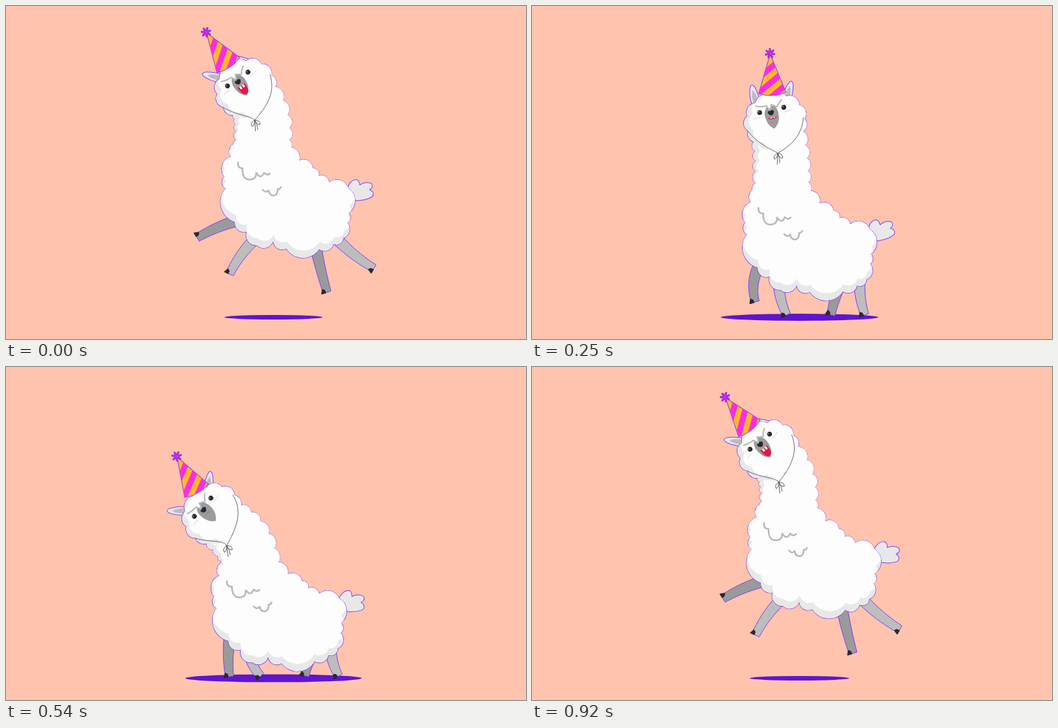
Recreate the animation shown at these times as an HTML page. Size 800x513 px, loop 940 ms.

```html
<!DOCTYPE html>
<html lang="en">
<head>
<meta charset="utf-8">
<title>Party llama</title>
<style>
html, body { margin: 0; width: 100%; height: 100%; overflow: hidden; background: #ffc3ae; }
svg { display: block; width: 100vw; height: 100vh; }
.line { stroke: #7a3cff; stroke-width: 1; stroke-linejoin: round; }
.thin { fill: none; stroke: #555; stroke-width: .9; stroke-linecap: round; }
.fleece { fill: none; stroke: #b9b9bb; stroke-width: 2.6; stroke-linecap: round; stroke-linejoin: round; }
</style>
</head>
<body>
<svg viewBox="0 0 800 513" preserveAspectRatio="none">
  <defs>
    <clipPath id="cone"><path d="M0-60L-21 0Q0 8 21 0Z"/></clipPath>
    <clipPath id="bodyClip"><path class="bodyShape"/></clipPath>
    <clipPath id="headClip"><path class="headShape"/></clipPath>
  </defs>
  <ellipse id="shadow" cx="411.5" cy="479.5" fill="#5f15cf"/>
  <g id="legs"></g>
  <g class="onBody">
    <path id="tail" class="line" fill="#e8e8e8" d="M525 284Q530 270 539 269Q546 268 546 278Q556 273 564 278Q567 284 560 287Q568 292 563 298Q553 303 535 301Z"/>
  </g>
  <g class="onHead">
    <g id="earL" class="ear"></g>
    <g id="earR" class="ear"></g>
  </g>
  <g class="onBody"><path class="bodyShape line"/></g>
  <path class="neckShape line"/>
  <g class="onHead"><path class="headShape line"/></g>
  <g class="onBody" clip-path="url(#bodyClip)">
    <path class="bodyShape" fill="#e8e8e8"/>
    <path class="bodyShape" fill="#fdfdfe" transform="translate(1 -11.500)"/>
  </g>
  <path class="neckShape" fill="#e8e8e8"/>
  <path id="neck" fill="#fdfdfe"/>
  <g class="onBody fleece">
    <path d="M357 241Q356 250 364 250Q363 268 376 267.500Q385 267 385 257Q392 268 397 257Q402 262 406 258"/>
    <path d="M395 283Q400 289 404 284Q405 292 412 292Q418 291 418 282Q421 283 423 279"/>
  </g>
  <g class="onHead" clip-path="url(#headClip)">
    <path class="headShape" fill="#e8e8e8"/>
    <path class="headShape" fill="#fdfdfe" transform="translate(13 -2) scale(1.1)"/>
  </g>
  <g class="onHead">
    <path fill="none" stroke="#dcdcde" d="M17 7Q24 8 31 5M-31 9Q-26 6 -19 8"/>
    <path fill="#9c9c9c" d="M-12 4Q-9-8-1-8Q7-8 9 4Q10 21-2 29Q-13 22-12 4Z"/>
    <path id="mouth" fill="#e2164a"/>
    <path id="teeth" fill="#fff"/>
    <path fill="#2a2830" d="M-7 3Q-6 0-2 0Q2 0 3 3Q1 8-2 8Q-5 8-7 3Z"/>
    <path class="fleece" style="fill:#fdfdfe;stroke-width:2.2" d="M-23-11Q-14-7-7-8L-3 0Q0-4 1-8Q6-5 9-3Q12-8 18-12"/>
    <g id="eyeL" class="eye"></g>
    <g id="eyeR" class="eye"></g>
    <g id="hat">
      <path class="line" fill="#fdb92a" d="M0-60L-21 0Q0 8 21 0Z"/>
      <path clip-path="url(#cone)" stroke="#ff2be2" stroke-width="9" d="M-30-16.500L30-61.500M-30 5.500L30-39.500M-30 27.500L30-17.500"/>
      <path class="pom" stroke="#7a1fe0" stroke-width="3.200" stroke-linecap="round"/>
      <path class="pom" stroke="#e02be6" stroke-width="1.500" stroke-linecap="round"/>
    </g>
  </g>
  <path id="string" class="thin"/>
  <path id="bow" class="thin" d="M0 0Q-8 3-6 9Q-2 9 0 0Q8 2 7 8Q2 9 0 0L-2 17M0 0Q3 8 2 15"/>
</svg>
<script>
const $ = id => document.getElementById(id);
const all = (cls, name, value) => document.querySelectorAll("." + cls).forEach(el => el.setAttribute(name, value));
const LOOP = 940, STEP = 20, RAD = Math.PI / 180;

// Key poses: time, body drop, head x, head y, head tilt
const poses = [
  [0, 0, 356.5, 112.5, -34],
  [80, 14, 377, 106, -18],
  [160, 50.5, 392, 130, -3],
  [320, 76.5, 342, 186, -25],
  [540, 83, 302.5, 216, -48],
  [660, 58, 297, 203, -72],
  [760, 13.5, 315, 150, -62],
  [920, -.5, 350.5, 115, -38]
];
const legs = [
  { hip: [508, 358], land: [512, 476], fly: [566, 404], bend: 5, fill: "#bdbdbd" },
  { hip: [476, 368], land: [460, 476], fly: [494, 441], bend: 2, fill: "#9a9a9a" },
  { hip: [384, 358], land: [392, 476], fly: [344, 413], bend: 6, fill: "#bdbdbd" },
  { hip: [354, 331], land: [344, 477], fly: [294, 357], bend: 4, fill: "#9a9a9a", front: true }
];
// Notches of the body fleece, clockwise from the neck
const bodyPts = [
  [352, 212], [436, 218], [451, 238], [472, 250], [481, 262], [497, 272], [527, 281], [527, 319], [525, 334], [519, 358],
  [504, 367], [482, 375], [431, 374], [411, 363], [386, 369], [370, 348], [352, 333], [338, 281], [336, 263], [346, 232]
];

const mix = (a, b, s) => a + (b - a) * s;
const ramp = (t, a, b) => {
  const s = Math.min(1, Math.max(0, (t - a) / (b - a)));
  return s * s * (3 - 2 * s);
};
const turn = (deg, x, y) => {
  const c = Math.cos(deg * RAD), s = Math.sin(deg * RAD);
  return [x * c - y * s, x * s + y * c];
};
const num = v => v.toFixed(2);
const pair = p => num(p[0]) + " " + num(p[1]);
const poly = pts => "M" + pts.map(pair).join("L") + "Z";
const set = (id, d) => $(id).setAttribute("d", d);
const move = (id, value) => $(id).setAttribute("transform", value);

// Smooth curve through the looping key poses
function poseAt(time) {
  const t = (time + LOOP) % LOOP, n = poses.length;
  const key = i => poses[(i + n) % n];
  const when = i => key(i)[0] + LOOP * Math.floor(i / n);
  const i = poses.findLastIndex(p => p[0] <= t);
  const h = when(i + 1) - when(i), s = (t - when(i)) / h;
  return [1, 2, 3, 4].map(j => {
    const slope = k => (key(k + 1)[j] - key(k - 1)[j]) / (when(k + 1) - when(k - 1)) * h;
    return mix(key(i)[j], key(i + 1)[j], s * s * (3 - 2 * s))
      + s * (1 - s) * (slope(i) * (1 - s) - slope(i + 1) * s);
  });
}

// Closed outline whose edges all bulge outwards
function fluffy(pts) {
  return "M" + pair(pts[0]) + pts.map((p, i) => {
    const q = pts[(i + 1) % pts.length];
    const r = num(Math.hypot(q[0] - p[0], q[1] - p[1]) * .6);
    return `A${r} ${r} 0 0 1 ${pair(q)}`;
  }).join("") + "Z";
}

// Bezier point moved sideways by off
function beside([a, b, c, d], s, off) {
  const r = 1 - s;
  const p = [0, 1].map(k => r * r * r * a[k] + 3 * r * r * s * b[k] + 3 * r * s * s * c[k] + s * s * s * d[k]);
  const v = [0, 1].map(k => r * r * (b[k] - a[k]) + 2 * r * s * (c[k] - b[k]) + s * s * (d[k] - c[k]));
  const len = Math.hypot(...v);
  return [p[0] - v[1] / len * off, p[1] + v[0] / len * off];
}

// Outline around a curve, widths given by position
function tube(curve, n, left, right) {
  const a = [], b = [];
  for (let i = 0; i <= n; i++) {
    a.push(beside(curve, i / n, -left(i / n)));
    b.unshift(beside(curve, i / n, right(i / n)));
  }
  return [...a, ...b];
}

function drawLeg(leg, hip, foot, bend) {
  const dx = foot[0] - hip[0], dy = foot[1] - hip[1], len = Math.hypot(dx, dy);
  const knee = [(hip[0] + foot[0]) / 2 - dy / len * bend, (hip[1] + foot[1]) / 2 + dx / len * bend];
  const curve = [hip, hip.map((v, k) => mix(v, knee[k], 2 / 3)), foot.map((v, k) => mix(v, knee[k], 2 / 3)), foot];
  const width = s => 8.8 - 2.6 * s;
  leg.shape.setAttribute("d", poly(tube(curve, 10, width, width)));
  const ang = Math.atan2(foot[1] - knee[1], foot[0] - knee[0]) / RAD;
  const hoof = [[.5, 9], [.5, 2], [-4, 2.5], [-6.5, 6]].map(p => turn(ang, ...p));
  leg.hoof.setAttribute("d", poly(hoof.map(p => [p[0] + foot[0], p[1] + foot[1]])));
}

function drawNeck(base, up, top, down, tilt) {
  const len = Math.hypot(base[0] - top[0], base[1] - top[1]) * .35;
  const reach = (p, dir) => p.map((v, k) => v + dir[k] * len);
  const curve = [base, reach(base, up), reach(top, down), top];
  const width = s => 41 - 3 * s;
  const nape = s => width(s) + 11 * (tilt / 70) ** 2 * Math.sin(s * 2.6);
  all("neckShape", "d", fluffy(tube(curve, 5, width, nape)));
  set("neck", fluffy(tube(curve, 5, s => width(s) - 11 * s, nape)));
}

function draw(t) {
  const [dy, cx, cy, tilt] = poseAt(t);
  const speed = poseAt(t + 15)[0] - poseAt(t - 15)[0];
  const crouch = ramp(t, 160, 320) - ramp(t, 540, 720);
  const air = 1 - ramp(t, 0, 135) + ramp(t, 670, 800);
  const lift = 1 - ramp(t, 20, 320) + ramp(t, 600, 820);
  const dx = -12 * crouch, lean = -4.5 * crouch;
  const onBody = (x, y) => {
    const p = turn(lean, x - 430, y - 310);
    return [p[0] + 430 + dx, p[1] + 310 + dy];
  };
  const onHead = (x, y) => {
    const p = turn(tilt, x, y);
    return [p[0] + cx, p[1] + cy];
  };

  const rx = 76 + .71 * poseAt(t - 20)[0];
  $("shadow").setAttribute("rx", num(rx));
  $("shadow").setAttribute("ry", num(rx * .045));

  for (const leg of legs) {
    const rise = leg.front ? lift : air;
    const swing = leg.front ? ramp(lift, .15, .6) : air;
    const foot = [mix(leg.land[0], leg.fly[0], swing), mix(leg.land[1], leg.fly[1], rise)];
    drawLeg(leg, onBody(...leg.hip), foot, leg.bend + 250 * (swing - rise) ** 2);
  }

  all("onBody", "transform", `translate(${num(dx)} ${num(dy)}) rotate(${num(lean)} 430 310)`);
  move("tail", `rotate(${num(-2.6 * speed)} 528 290)`);
  drawNeck(onBody(394, 222), turn(lean, 0, -1), onHead(1, 42), turn(tilt, 0, 1), tilt);

  all("onHead", "transform", `translate(${num(cx)} ${num(cy)}) rotate(${num(tilt)})`);
  const flop = 1 - ramp(t, 10, 150);
  const earL = -42 * (flop + ramp(t, 340, 540)) + 20 * ramp(t, 540, 660) - 22 * ramp(t, 760, 920);
  const earR = -38 * flop + 55 * ramp(t, 160, 320) - 93 * ramp(t, 540, 650);
  move("earL", `translate(-22 -16) rotate(${num(earL)})`);
  move("earR", `translate(26 -12) rotate(${num(earR)})`);
  const lag = 18 * ramp(t, 160, 320) - 20 * ramp(t, 650, 750) + 2 * ramp(t, 760, 920);
  move("hat", `translate(0 15) rotate(${num(lag)}) translate(0 -41)`);
  const eye = 1 - .5 * ramp(t, 560, 660) + .5 * ramp(t, 660, 770);
  move("eyeL", `translate(-19 0) scale(1 ${num(eye)})`);
  move("eyeR", `translate(19 0) scale(1 ${num(eye)})`);

  const low = num(11.5 + 15 * lift), bite = num(4.5 * Math.min(1, lift * 1.6));
  set("mouth", `M-8 11Q-2 13 5 11Q6 ${low} -1 ${low}Q-8 ${low} -8 11Z`);
  set("teeth", `M-5 11.500h3v${bite}h-3zM0 11.500h3v${bite}h-3z`);

  const bow = onHead(tilt * .4, 67);
  const cord = (...pts) => {
    const [a, b, c] = pts.map(p => pair(onHead(...p)));
    return `M${a}C${b} ${c} ${pair(bow)}`;
  };
  set("string", cord([-43, 24], [-32, 46], [-16, 57]) + cord([45, 22], [39, 43], [24, 58]));
  move("bow", `translate(${pair(bow)}) rotate(${num(tilt * .3)})`);
}

function setup() {
  const add = (parent, attrs) => {
    const el = document.createElementNS(parent.namespaceURI, "path");
    for (const k in attrs) el.setAttribute(k, attrs[k]);
    return parent.appendChild(el);
  };
  for (const leg of legs) {
    leg.shape = add($("legs"), { class: "line", fill: leg.fill });
    leg.hoof = add($("legs"), { fill: "#2a2830", stroke: "#2a2830", "stroke-linejoin": "round" });
  }
  document.querySelectorAll(".ear").forEach(ear => {
    add(ear, { class: "line", fill: "#e8e8e8", d: "M-6 4Q-8-16-2-27Q1-30 4-24Q8-10 6 4Z" });
    add(ear, { fill: "#bcbcbe", d: "M-3 4Q-5-12 0-20Q5-12 4 4Z" });
  });
  document.querySelectorAll(".eye").forEach(eye => {
    add(eye, { fill: "#2a2830", d: "M-3.700 0a3.700 3.700 0 0 1 7.400 0a3.700 3.700 0 0 1 -7.400 0Z" });
    add(eye, { fill: "#bbb", d: "M-2.200-1.500a.9.9 0 0 1 1.800 0a.9.9 0 0 1 -1.800 0Z" });
  });
  const ring = [], N = 11;
  let rays = "";
  for (let i = 0; i < N; i++) ring.push([2 + 45 * Math.sin(i / N * 360 * RAD), 18 - 40 * Math.cos(i / N * 360 * RAD)]);
  for (let i = 0; i < 7; i++) {
    const p = turn(i * 360 / 7, 0, -6.5);
    rays += "M0-61L" + pair([p[0], p[1] - 61]);
  }
  all("pom", "d", rays);
  all("headShape", "d", fluffy(ring));
  all("bodyShape", "d", fluffy(bodyPts));
}

const start = performance.now();
function tick() {
  const t = (performance.now() - start) % LOOP;
  draw(Math.floor(t / STEP) * STEP);
  requestAnimationFrame(tick);
}
setup();
tick();
</script>
</body>
</html>
```
